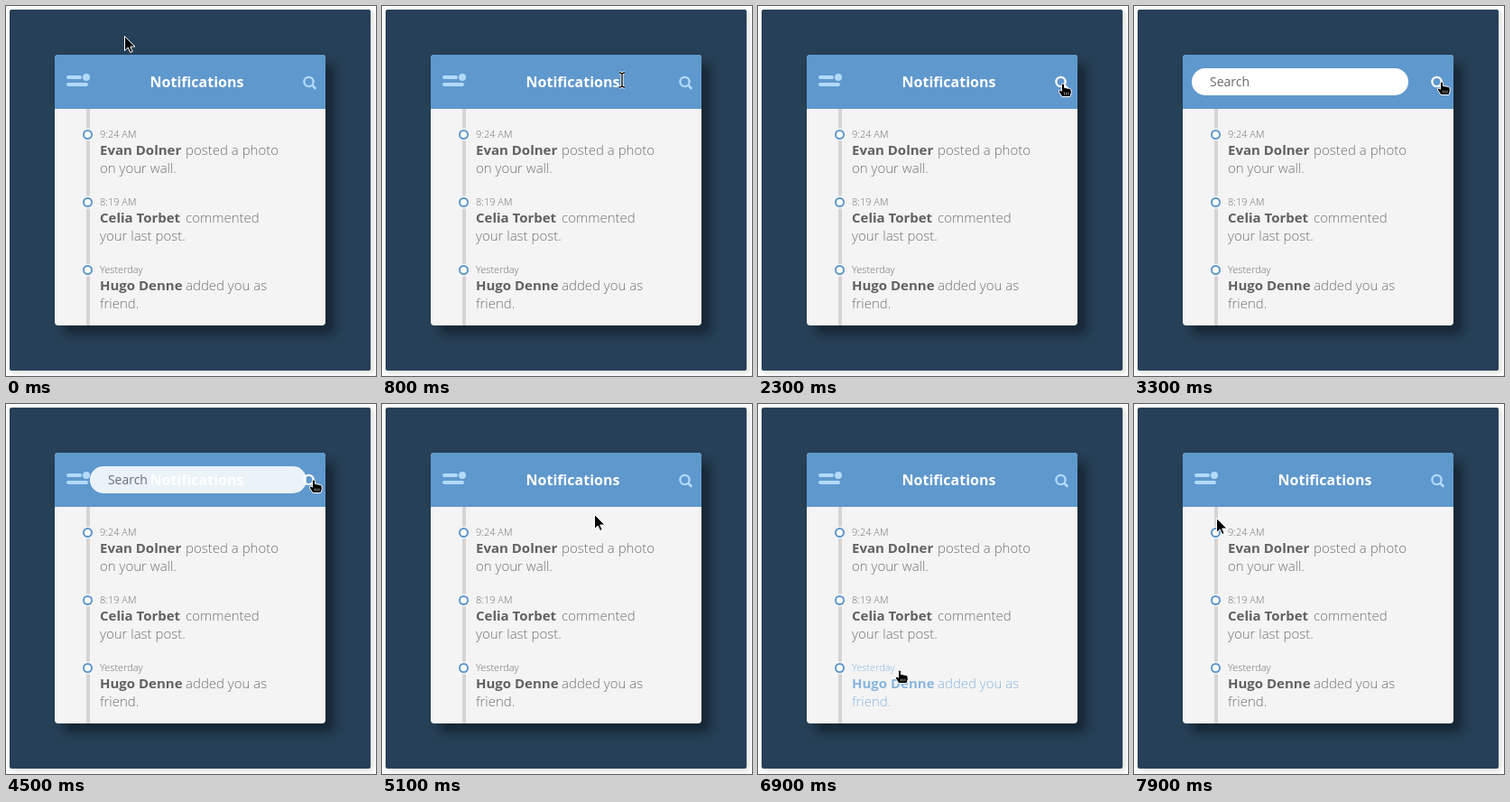
An HTML page that plays this animation: 410 px wide and 410 px high, repeating every 8 s.

```html
<!DOCTYPE html>
<html lang="en">
<head>
<meta charset="utf-8">
<title>Notifications</title>
<style>
  html, body { margin: 0; width: 100%; height: 100%; overflow: hidden; background: #fff; }
  svg { display: block; }
  text { font: 300 15px "Open Sans", sans-serif; white-space: pre; }
  .stage { fill: #264057; filter: drop-shadow(2px 2px 3px rgba(0, 0, 0, .17)); }
  .shadow { fill: #f4f4f4; filter: drop-shadow(10px 10px 6px rgba(0, 0, 0, .4)); }
  .title { font-size: 16px; font-weight: 700; fill: #fff; text-anchor: middle; }
  .hint { font-size: 14px; font-weight: 400; fill: #6a6a6a; }
  .time { font-size: 11px; }
  .name { font-weight: 700; }
  .name, .time, .body { fill: currentColor; }
  .icon { fill: #b2dafd; }
  .lens { fill: none; stroke: currentColor; }
  .dot { fill: #fff; stroke: #5f98cd; stroke-width: 2; }
  .cursor path { stroke: #fff; stroke-linejoin: round; }
</style>
</head>
<body>
<svg width="410" height="410">
  <defs>
    <clipPath id="card"><rect x="54" y="54" width="300" height="300" rx="4"/></clipPath>
    <path id="stem" d="M-3 -8Q0 -8 0 -6Q0 -8 3 -8M0 -6V6M-3 8Q0 8 0 6Q0 8 3 8" fill="none"/>
  </defs>
  <rect class="stage" x="4" y="4" width="400" height="400" rx="2"/>
  <rect class="shadow" x="54" y="54" width="300" height="300" rx="4"/>
  <g clip-path="url(#card)">
    <rect x="54" y="54" width="300" height="60" fill="#5f98cd"/>
    <g class="icon">
      <rect x="67" y="77" width="17" height="4" rx="2"/>
      <rect x="67" y="85" width="24" height="4" rx="2"/>
      <circle cx="89" cy="79" r="4"/>
    </g>
    <text class="title" x="211.5" y="90">Notifications</text>
    <g id="bar">
      <rect x="64" y="69" width="240" height="30" rx="15" fill="#fff"/>
      <text class="hint" x="84" y="89">Search</text>
    </g>
    <g id="lens" class="lens">
      <circle cx="335.5" cy="84" r="5.1" stroke-width="2.3"/>
      <path d="M339.5 88L342.5 91" stroke-width="2.8" stroke-linecap="round"/>
    </g>
    <rect x="89" y="114" width="4" height="240" fill="#d4d4d4"/>
    <g id="list"></g>
  </g>
  <g class="cursor" id="arrow">
    <path d="M.5 .5V16.5L4.2 13L6.7 18.5L9.2 17.4L6.8 12H12Z"/>
  </g>
  <g id="beam">
    <use href="#stem" stroke="#fff" stroke-width="3.2"/>
    <use href="#stem" stroke="#000" stroke-width="1.3"/>
  </g>
  <g class="cursor" id="hand">
    <path d="M-1.6 1.5A1.6 1.6 0 0 1 1.6 1.5V4.5L7.2 5.4Q9.2 6 9.2 8V10.4L7.8 14.5H-1L-4.5 9.2Q-5 6.8 -3 7L-1.6 8.2Z"/>
    <path d="M1.5 9.5V12.5M3.7 9.5V12.5M5.9 9.5V12.5" stroke-width=".6"/>
  </g>
</svg>
<script>
const LOOP = 8000, STEP = 100, PITCH = 75;
const OPEN = 3300, CLOSE = 4435, SLIDE = 300;
const BLUE = [136, 181, 222], GREY = [112, 112, 112], DARK = [97, 97, 97];

const $ = id => document.getElementById(id);
const clamp = v => Math.min(1, Math.max(0, v));
const smooth = v => v * v * (3 - 2 * v);
const mix = (a, b, p) => a + (b - a) * p;
const blend = (a, b, p) => `rgb(${a.map((v, i) => Math.round(mix(v, b[i], p)))})`;

const items = [
  ['9:24 AM', 'Evan Dolner', 'posted a photo', 'on your wall.'],
  ['8:19 AM', 'Celia Torbet', 'commented', 'your last post.'],
  ['Yesterday', 'Hugo Denne', 'added you as', 'friend.']
];

$('list').innerHTML = items.map(([time, name, action, rest], i) => `
  <g transform="translate(0 ${i * PITCH})">
    <circle cx="90.5" cy="142.5" r="7" fill="#f4f4f4"/>
    <circle class="dot" cx="90.5" cy="142.5" r="4.5"/>
    <text class="time" x="104" y="146">${time}</text>
    <text class="name" x="104" y="165">${name}</text>
    <text class="body" x="199" y="165">${action}</text>
    <text class="body" x="104" y="185">${rest}</text>
  </g>`).join('');
const rows = [...$('list').children];

// pointer stops: time, x, y
const stops = [
  [0, 131, 33], [800, 266, 82], [1300, 279, 82], [2300, 338, 86], [3200, 338, 86],
  [OPEN, 341, 84], [4500, 341, 84], [5300, 200, 134], [5500, 174, 162], [5900, 169, 165],
  [6000, 163, 189], [6900, 157, 295], [7400, 154, 302], [7900, 91, 126], [LOOP, 91, 126]
];

function pointer(t) {
  const i = stops.findIndex(s => s[0] > t);
  const [t0, x0, y0] = stops[i - 1], [t1, x1, y1] = stops[i];
  const p = (t - t0) / (t1 - t0);
  return [Math.round(mix(x0, x1, p)), Math.round(mix(y0, y1, p))];
}

// how strongly row i is lit by a pointer at x, y
function glow(i, x, y) {
  const depth = y - 135 - i * PITCH;
  return x > 118 ? clamp(depth / 8) * clamp((64 - depth) / 8) : 0;
}

function draw(t) {
  const [x, y] = pointer(t);
  const inHeader = y > 66 && y < 100;
  const onLens = inHeader && x > 328;
  const onTitle = inHeader && x > 214;
  $('lens').style.color = onLens ? '#fff' : '#b2dafd';

  const away = smooth(clamp((t - CLOSE) / SLIDE));
  $('bar').setAttribute('transform', `translate(${240 * away} 0)`);
  $('bar').setAttribute('opacity', t < OPEN ? 0 : 1 - away);

  const glows = rows.map((row, i) => {
    const p = glow(i, x, y);
    row.style.color = blend(GREY, BLUE, p);
    row.querySelector('.name').style.color = blend(DARK, BLUE, p);
    return p;
  });

  const shape = onLens || Math.max(...glows) > 0 ? 'hand' : onTitle ? 'beam' : 'arrow';
  for (const id of ['arrow', 'beam', 'hand']) {
    $(id).setAttribute('transform', `translate(${x} ${y})`);
    $(id).setAttribute('visibility', id === shape ? 'visible' : 'hidden');
  }
}

const start = performance.now();
function tick() {
  const t = (performance.now() - start) % LOOP;
  draw(Math.floor(t / STEP) * STEP);
  requestAnimationFrame(tick);
}
tick();
</script>
</body>
</html>
```
